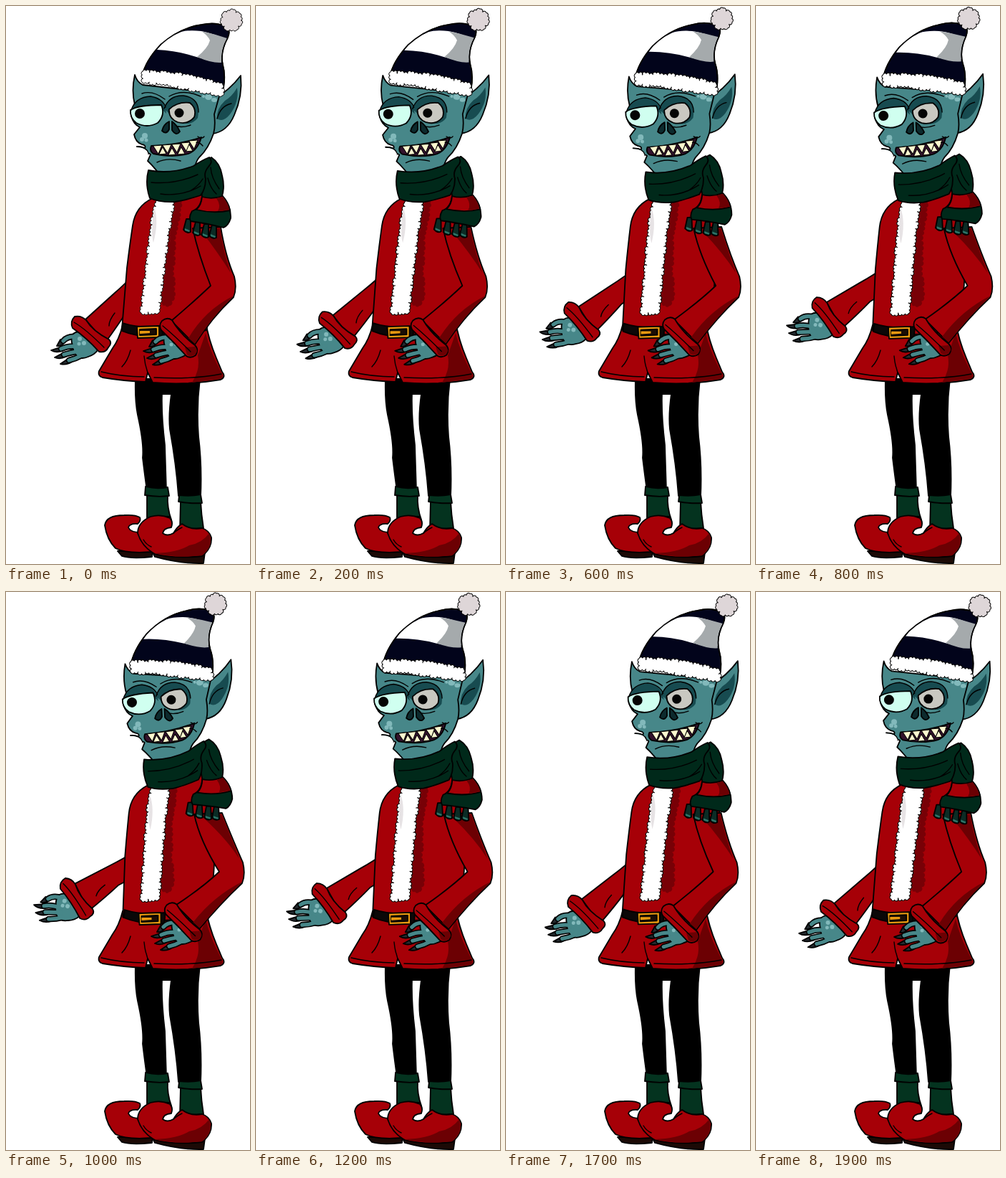
These frames come from a looping animation (341 by 778 pixels, 2 s). An HTML page:

```html
<!DOCTYPE html>
<html lang="en">
<head>
<meta charset="utf-8">
<title>Idle elf</title>
<style>
  html, body { margin: 0; width: 100%; height: 100%; overflow: hidden; background: #fff; }
  svg { display: block; width: 100%; height: 100%; }
  path, ellipse { stroke: #000; stroke-width: 1.8; stroke-linejoin: round; stroke-linecap: round; }
  .plain * { stroke: none; }
  .line * { fill: none; stroke-width: 1.4; }
  .thin * { stroke-width: 1; }
</style>
</head>
<body>
<svg id="stage" viewBox="0 0 341 778"></svg>
<script>
const RED = '#a60007', DARK_RED = '#6c0003', SKIN = '#478789', LID = '#174b50',
  GREEN = '#00291a', SOCK = '#04331f', NAVY = '#02041b';

const shape = (fill, d) => `<path fill="${fill}" d="${d}"/>`;
const plain = (...parts) => `<g class="plain">${parts.join('')}</g>`;
const lines = d => `<g class="line">${shape('none', d)}</g>`;
const group = (id, ...parts) => `<g id="${id}">${parts.join('')}</g>`;
const oval = (fill, x, y, rx, ry = rx) => `<ellipse fill="${fill}" cx="${x}" cy="${y}" rx="${rx}" ry="${ry}"/>`;
const stroke = (color, width, d) => `<path d="${d}" style="fill:none;stroke:${color};stroke-width:${width}"/>`;

// Closed clockwise outline made of uneven outward tufts.
function fuzz(fill, points, step = 5) {
  let d = `M${points[0]}`;
  points.forEach(([x, y], i) => {
    const [x2, y2] = points[(i + 1) % points.length];
    const length = Math.hypot(x2 - x, y2 - y), count = Math.max(1, Math.round(length / step));
    const r = length / count * .55;
    for (let k = 1; k <= count; k++) {
      const shift = k < count ? 1.4 * Math.sin(k * 2.4 + i) / length : 0;
      const px = x + (x2 - x) * k / count + (y2 - y) * shift;
      const py = y + (y2 - y) * k / count - (x2 - x) * shift;
      d += `A${r} ${r} 0 0 1 ${px} ${py}`;
    }
  });
  return `<g class="thin">${shape(fill, d + 'Z')}</g>`;
}

function pompom(x, y, radius) {
  const ring = Array.from({ length: 18 }, (_, i) => {
    const a = i / 18 * 2 * Math.PI, r = radius + 1.5 * Math.sin(i * 2.4);
    return [x + r * Math.cos(a), y + r * Math.sin(a)];
  });
  return fuzz('#ded6d8', ring, 6);
}

const fingers = ['M98 461Q86 460 80 467', 'M101 475Q88 473 77 478', 'M103 481Q91 483 81 486', 'M106 487Q97 492 88 494'];
const hand =
  ['M76 465L71 474Q78 475 83 468Z', 'M78 475L63 480Q69 484 79 481Z',
    'M81 483L68 490Q75 493 84 489Z', 'M88 491L76 499Q85 501 92 496Z'].map(d => shape('#252b30', d)).join('') +
  fingers.map(d => stroke('#000', 8.5, d)).join('') +
  shape(SKIN, 'M128 480Q124 486 115 489Q106 493 100 489Q93 482 93 473Q90 465 93 458Q100 451 112 457Z') +
  fingers.map(d => stroke(SKIN, 5.2, d)).join('') +
  plain(oval('#82b9bb', 103, 464, 3), oval('#82b9bb', 109, 470, 3), oval('#82b9bb', 102, 471, 2.5));

const legs =
  shape('#000', 'M181 520Q180 550 184 570Q193 610 191 630Q194 655 197 676L224 676Q223 640 222 612Q217 570 218 541L231 541Q227 570 229 590Q238 640 241 683L272 684Q274 640 269 600Q266 560 271 520Z') +
  shape(SOCK, 'M197 682L226 682Q225 700 231 716L197 718Z') +
  shape(SOCK, 'M195 670Q210 674 226 671L228 683Q212 685 194 682Z') +
  shape('#1c0a06', 'M156 760L205 760L204 768Q175 771 162 767Z') +
  shape(RED, 'M187 713Q181 709 165 710Q140 710 138 724Q141 744 153 756Q168 764 205 761L229 712Q214 711 200 713Q190 721 188 734Q174 734 171 727Q173 721 184 722Q189 718 187 713Z') +
  shape(SOCK, 'M244 690L272 690Q273 710 276 728L243 730Z') +
  shape(SOCK, 'M242 682Q258 684 272 681L274 693Q258 694 241 691Z') +
  shape('#1c0a06', 'M205 762L278 762L276 777Q244 778 208 768Z') +
  shape(RED, 'M229 714Q216 708 202 712Q184 720 184 735Q190 754 208 764Q235 771 274 767Q288 756 287 741Q284 731 274 728Q258 731 246 722Q239 726 234 735Q225 740 219 735Q220 728 231 727Q234 719 229 714Z') +
  plain(shape(DARK_RED, 'M284 735Q291 754 274 766Q240 770 208 763Q240 762 256 752Q274 749 284 735Z')) +
  lines('M192 744Q196 751 203 754M234 735Q238 731 246 727');

const skirt =
  shape(RED, 'M163 445Q158 465 149 477L130 509Q128 516 135 518Q165 523 195 524L198 511L205 525Q255 529 300 521Q308 517 302 510L294 491Q283 465 279 440Z') +
  plain(shape(DARK_RED, 'M279 456Q285 482 302 513Q304 519 298 520L260 525Q272 507 268 487Z')) +
  lines('M133 510Q162 517 193 517M207 518Q260 521 301 513M198 511Q194 500 193 488M174 480Q170 495 162 503');

const torso =
  shape(RED, 'M205 268Q181 279 177 306Q173 333 169 365L162 450Q220 464 280 452Q288 425 292 392L300 310Q295 255 260 242Z') +
  plain(fuzz('#780006', [[238, 266], [245, 275], [236, 320], [233, 370], [235, 405], [228, 418], [218, 414], [222, 350]], 7)) +
  fuzz('#fff', [[209, 274], [235, 268], [227, 315], [221, 360], [213, 428], [189, 428], [196, 370], [202, 315]]) +
  plain(shape('#e7e3e5', 'M207 280Q214 300 206 330Q202 318 207 280Z'));

const belt =
  shape('#0b0808', 'M163 442Q188 450 220 446L219 461Q186 463 162 453Z') +
  shape('#e99a10', 'M183 447L214 446L214 462L184 463Z') +
  shape('#1c0e05', 'M187 451L210 450L210 458L187 459Z') +
  plain(shape('#e99a10', 'M187 453L201 453L201 456L187 457Z'));

const leftArm =
  hand +
  shape(RED, 'M188 365Q166 388 152 400L111 437L139 469Q158 443 170 424L196 400Z') +
  shape(RED, 'M96 433Q105 431 112 438Q121 453 144 465Q149 470 143 476Q139 484 130 482Q113 463 93 449Q89 440 96 433Z') +
  lines('M95 441Q111 450 137 476M152 428Q144 438 144 446');

const rightCuff =
  shape(RED, 'M218 439Q225 433 232 438Q243 457 264 473Q270 479 265 487Q258 492 252 488Q235 469 217 452Q213 445 218 439Z') +
  plain(shape(DARK_RED, 'M250 476L264 475Q270 481 264 486Q258 490 253 486Z')) +
  lines('M219 446Q236 460 258 482');

const tail =
  [[254, 297], [267, 301], [279, 304], [290, 305]].map(([x, y]) =>
    shape('#0b2c25', `M${x - 2} ${y}L${x - 6} ${y + 15}Q${x - 1} ${y + 21} ${x + 4} ${y + 18}L${x + 4} ${y}Z`) +
    plain(shape('#2d7568', `M${x - 4} ${y + 13}L${x + 3} ${y + 16}L${x + 2} ${y + 18}L${x - 4} ${y + 16}Z`))).join('') +
  shape(GREEN, 'M268 220L287 211Q299 219 302 236Q306 252 302 265Q315 278 314 296Q311 306 304 309Q280 303 258 300Q255 294 260 286Q272 282 274 265Z') +
  shape(RED, 'M274 266Q288 270 303 265Q311 274 313 285Q290 290 266 284Q273 278 274 266Z') +
  plain(shape(DARK_RED, 'M294 268L303 266Q311 276 312 284L296 286Q301 278 294 268Z')) +
  lines('M286 225Q287 240 298 255M282 240Q286 255 294 262');

const wrap =
  shape(GREEN, 'M199 229Q231 235 262 223Q274 215 284 211Q290 217 283 224Q276 232 279 241Q279 255 272 264Q250 271 236 273Q215 274 201 268Q194 248 199 229Z') +
  lines('M203 246Q237 249 268 235M216 262Q246 266 272 251M257 258Q269 251 275 241');

const upperTeeth = [[212, 195], [225, 194], [238, 193], [251, 191], [262, 188]].map(([x, y]) =>
  shape('#fdf9cf', `M${x - 6} ${y}L${x + 6} ${y - 1}L${x + 1} ${y + 11}Z`));
const lowerTeeth = [[219, 207], [232, 208], [245, 207], [256, 203]].map(([x, y]) =>
  shape('#fdf9cf', `M${x - 5} ${y}L${x + 5} ${y - 1}L${x} ${y - 10}Z`));

const head =
  shape(SKIN, 'M288 132Q313 117 328 97Q331 125 319 152Q309 176 288 178Z') +
  plain(shape(LID, 'M323 114Q326 134 313 151Q303 163 295 157Q294 143 306 132Q316 126 323 114Z')) +
  lines('M295 157Q300 139 315 136') +
  shape(SKIN, 'M180 96Q183 106 191 110L299 122L291 151Q293 167 290 178Q283 199 270 211Q264 218 260 240L222 245Q208 225 198 216L202 207Q200 204 196 208Q191 209 183 196Q189 196 194 198Q196 194 190 193Q181 190 179 179L187 169Q178 165 175 153Q174 145 180 138Q175 118 180 96Z') +
  plain(shape('#fff', 'M180 197Q194 196 199 204L198 209Q192 215 182 207Z')) +
  lines('M183 196Q196 196 199 205') +
  // Eyes
  plain(shape(LID, 'M175 146Q181 127 202 126Q222 129 224 150L220 146Z'),
    shape(LID, 'M221 143Q228 124 248 125Q273 129 268 156Q262 164 252 164L228 150Z')) +
  shape('#d0fff0', 'M174 145Q185 138 217 138Q223 152 212 163Q197 171 182 163Q173 156 174 145Z') +
  shape('#c9c8c1', 'M228 144Q240 133 257 135Q267 143 263 155Q254 166 240 162Q227 157 228 144Z') +
  plain(oval('#050505', 187, 150, 7), oval('#050505', 242, 149, 6.5)) +
  lines('M175 145Q181 127 202 126Q219 129 223 141M221 143Q228 124 248 125Q269 128 269 148M190 122Q205 117 222 130M228 126Q247 115 272 126M234 166Q244 171 258 166') +
  // Nose and mouth
  shape('#0c2a2d', 'M228 161Q220 165 218 174Q224 180 228 172Z') +
  shape('#0c2a2d', 'M232 161Q239 166 243 175Q238 182 232 173Z') +
  shape('#33122c', 'M203 195Q240 194 273 183Q268 201 255 206Q234 212 206 206Q200 202 203 195Z') +
  `<g class="thin">${lowerTeeth.join('')}${upperTeeth.join('')}</g>` +
  lines('M268 182Q274 186 277 182M211 218Q226 211 244 216M266 190Q271 190 275 195') +
  plain(oval('#82b9bb', 194, 181, 4), oval('#82b9bb', 190, 186, 3), oval('#82b9bb', 196, 187, 2.5),
    oval('#82b9bb', 283, 127, 5, 4), oval('#82b9bb', 291, 131, 4, 3), oval('#82b9bb', 276, 126, 2));

const hatOutline = 'M190 98Q195 76 216 54Q243 30 274 26Q292 22 306 28Q315 32 310 44Q299 64 303 82Q307 96 304 114';
const hat =
  shape(NAVY, hatOutline + 'Q250 106 190 98Z') +
  plain(shape('#fff', 'M211 61Q222 45 245 36Q255 33 273 35Q290 38 307 47Q300 60 301 76Q287 77 266 71Q239 62 211 61Z'),
    shape('#a5aaac', 'M273 35Q291 39 309 45Q300 60 301 79Q288 80 267 71Q282 59 285 48Q282 41 273 35Z')) +
  lines(hatOutline) +
  fuzz('#fff', [[191, 91], [225, 93], [262, 98], [303, 110], [302, 125], [280, 121], [250, 115], [220, 109], [190, 106]]) +
  pompom(315, 20, 14);

const stage = document.getElementById('stage');
stage.innerHTML = [
  group('leftArm', leftArm), legs, skirt, group('torso', torso), group('belt', belt),
  group('rightHand', `<g transform="translate(129 1)">${hand}</g>`),
  `<path id="sleeve" fill="${RED}"/>`,
  plain(`<path id="sleeveShade" fill="${DARK_RED}"/>`),
  group('rightCuff', rightCuff), group('tail', tail),
  group('head', head), group('hat', hat), group('wrap', wrap)
].join('');

// Full-swing pose of each part: degrees, pivot, shift.
const swing = {
  leftArm: [14.7, 214, 370, -1, -2],
  torso: [-2.6, 235, 425, 0, 0],
  belt: [0, 0, 0, 2.5, 1],
  rightHand: [0, 0, 0, 11, -1],
  rightCuff: [0, 0, 0, 6.5, -2.5],
  tail: [-4, 290, 262, 0, -6],
  wrap: [-5, 245, 300, 0, 0],
  head: [-2.7, 264, 385, 0, 0],
  hat: [-4.3, 265, 315, 0, 0]
};
const part = id => document.getElementById(id);

function pose(p) {
  for (const [id, [angle, cx, cy, dx, dy]] of Object.entries(swing)) {
    part(id).setAttribute('transform', `translate(${dx * p} ${dy * p}) rotate(${angle * p} ${cx} ${cy})`);
  }
  const elbow = (x, y) => `${x + 12 * p} ${y}`;
  const wrist = (x, y) => `${x + 6.5 * p} ${y - 2.5 * p}`;
  const shoulder = (x, y) => `${x + 2 * p} ${y}`;
  part('sleeve').setAttribute('d',
    `M${shoulder(261, 310)}Q${shoulder(269, 347)} ${elbow(286, 390)}Q${elbow(264, 411)} ${wrist(231, 439)}` +
    `L${wrist(264, 472)}Q${elbow(287, 435)} ${elbow(318, 406)}Q${elbow(323, 394)} ${elbow(319, 377)}` +
    `Q${elbow(307, 350)} ${shoulder(300, 308)}Z`);
  part('sleeveShade').setAttribute('d',
    `M${shoulder(274, 315)}L${shoulder(299, 310)}Q${elbow(304, 345)} ${elbow(314, 372)}Q${elbow(297, 345)} ${shoulder(274, 315)}Z` +
    `M${elbow(318, 404)}Q${elbow(289, 432)} ${wrist(264, 471)}L${wrist(255, 463)}Q${elbow(278, 424)} ${elbow(318, 404)}Z`);
}

function frame() {
  const t = Math.floor(performance.now() % 2000 / 100) / 10;
  pose(t <= 1 ? t : 2 - t);
  requestAnimationFrame(frame);
}
frame();
</script>
</body>
</html>
```
